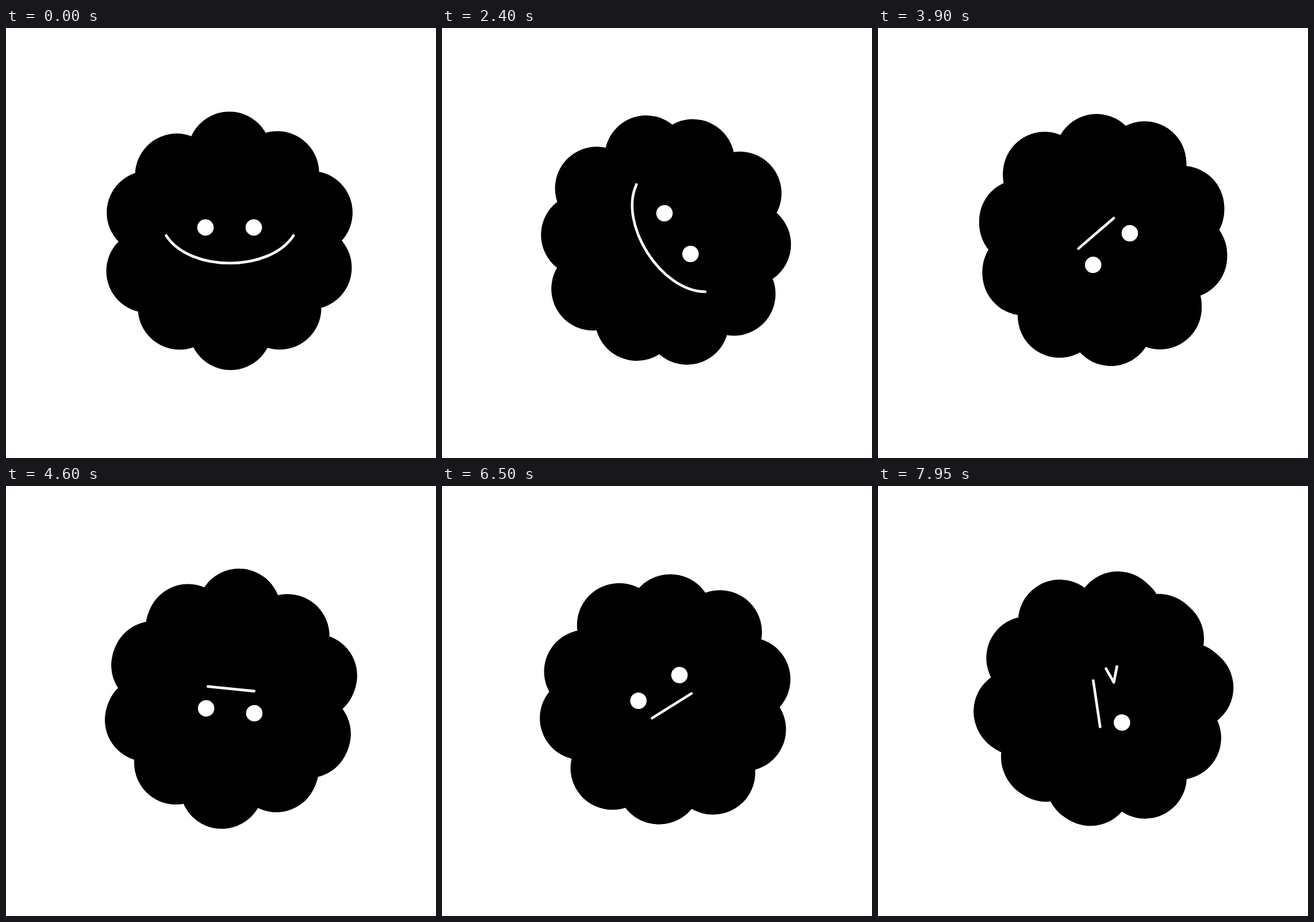
These frames come from a looping animation (748 px wide and 748 px high, 8 s). An HTML page:

```html
<!DOCTYPE html>
<html lang="en">
<head>
<meta charset="utf-8">
<title>Spinning flower</title>
<style>
  html, body { margin: 0; width: 100%; height: 100%; overflow: hidden; background: #fff; }
  svg { display: block; width: 100%; height: 100%; }
  .face { fill: #fff; }
  .line { fill: none; stroke: #fff; stroke-width: 4.6; stroke-linecap: round; stroke-linejoin: round; }
</style>
</head>
<body>
<svg id="stage" viewBox="0 0 748 748"></svg>
<script>
const LOOP = 8000, STEP = 50;
const SPIN_TIME = 14000, SPIN_ANGLE = 734.5;
const PETAL_R = 72.6;

// Petals as [clockwise angle from the top, distance from the middle]
const petals = [
  [0, 152], [35.3, 144.6], [71, 150], [108.5, 148], [143.2, 146],
  [179.2, 152.5], [216.5, 145.5], [249.5, 151], [289.2, 149], [321.2, 146]
];

const circle = (x, y, r, cls = '') =>
  `<circle class="${cls}" cx="${x.toFixed(2)}" cy="${y.toFixed(2)}" r="${r}"/>`;
const line = d => `<path class="line" d="${d}"/>`;
const eye = (x, y) => circle(x, y, 14.3, 'face');

function flower(x, y) {
  const rim = petals.map(([deg, dist]) => {
    const a = deg * Math.PI / 180;
    return circle(x + dist * Math.sin(a), y - dist * Math.cos(a), PETAL_R);
  });
  return circle(x, y, 150) + rim.join('');
}

// Each mood is a whole flower laid over the earlier ones, turning about its own pivot
const moods = [
  {
    start: 0, pivot: [389.6, 371.2],
    art: flower(-1.1, -1.2) + eye(-42.6, -24.2) + eye(41.4, -24.2) +
      line('M-111 -10.2C-70 53.8 69 53.8 110.5 -10.2')
  },
  {
    start: 3500, pivot: [390.5, 369],
    art: flower(-1.6, 0.9) + eye(-43.8, -22) + eye(40.4, -22) +
      line('M-39.8 16.2H41.2')
  },
  {
    start: 7000, pivot: [390.5, 369],
    art: flower(4.6, -4.2) + eye(47, -27.3) +
      line('M-50 -13.6L-24.3 -23.5L-50.7 -32.9') + line('M-32.5 11.4H48.9')
  }
];

const stage = document.getElementById('stage');
stage.innerHTML = moods.map(m => `<g>${m.art}</g>`).join('');
const layers = [...stage.children];

const ease = u => u * u * (3 - 2 * u);

function draw(t) {
  const angle = SPIN_ANGLE * ease(t / SPIN_TIME);
  moods.forEach(({ start, pivot }, i) => {
    layers[i].setAttribute('transform', `translate(${pivot}) rotate(${angle})`);
    layers[i].setAttribute('visibility', t >= start ? 'visible' : 'hidden');
  });
}

const begin = performance.now();
function tick() {
  const t = (performance.now() - begin) % LOOP;
  draw(Math.floor(t / STEP) * STEP);
  requestAnimationFrame(tick);
}
draw(0);
requestAnimationFrame(tick);
</script>
</body>
</html>
```
